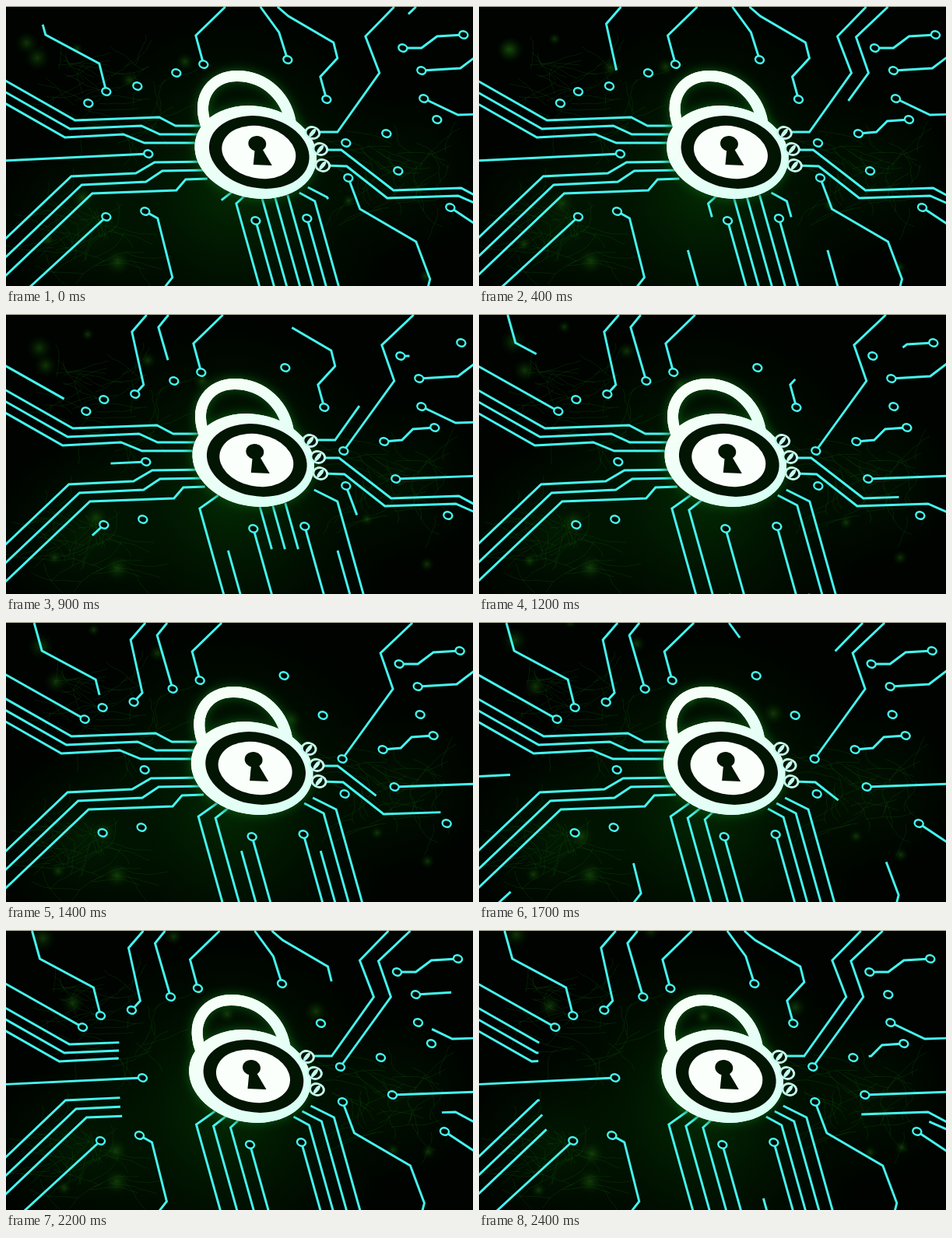
Write an HTML page with a canvas that moves like this. It is 600 px wide and 360 px high and loops after 2.5 s.

```html
<!DOCTYPE html>
<html lang="en">
<head>
<meta charset="utf-8">
<title>Circuit lock</title>
<style>
  html, body { margin: 0; width: 100%; height: 100%; overflow: hidden; background: #000; }
  canvas { display: block; }
</style>
</head>
<body>
<canvas id="stage" width="600" height="360"></canvas>
<script>
const ctx = document.getElementById('stage').getContext('2d');
const LOOP = 2500, STEP = 100, TAU = Math.PI * 2;
const SPEED = .34;      // px per ms along every wire
const LEAN = .28;       // sideways run of the wires that rise from the bottom
const DRIFT = 1 / 300;  // px per ms, whole scene to the left
const CYAN = '#45f8f0', DARK = '#021402';
const clamp = (v, lo, hi) => Math.max(lo, Math.min(hi, v));
const wires = [], dots = [];

// A wire is lit, drains along its path from each "off" time and refills after the gap.
// ends: 1 puts a dot on the last point, 2 on the first as well.
function wire(path, offs = [], { ends = 0, gap = 1070 } = {}) {
  const pts = path.trim().split(' ').map(p => p.split(',').map(Number));
  let len = 0;
  pts.reduce((a, b) => (len += Math.hypot(b[0] - a[0], b[1] - a[1]), b));
  if (ends > 0) dots.push(pts[pts.length - 1]);
  if (ends > 1) dots.push(pts[0]);
  const on = [-Infinity, ...offs.map(t => t + gap)], off = [...offs, Infinity];
  wires.push({ shape: new Path2D('M' + pts.join('L')), len, on, off });
}
const lead = (path, ...offs) => wire(path, offs, { ends: 1 });
const link = (path, ...offs) => wire(path, offs, { ends: 2, gap: 390 });
const rise = (x, y, rest = '') => `${x + LEAN * (362 - y)},362 ${x},${y} ${rest}`;

// top
lead('40,0 50,36 119,73 128,109', -70);
lead('-12,58 105,124', -470);
lead('183,0 164,22 179,90 168,102', -935);
lead('211,0 198,16 218,85', -360);
lead('281,0 243,37 253,74');
lead('326,0 350,33 361,68', 560);
lead('348,0 362,12 420,46 425,66 403,90 411,119', 820);
lead('526,0 485,39 501,85 436,175', -1110);
wire('498,0 461,38 479,85 425,161 395,161', [480]);

// right
link('587,36 553,38 533,53 509,53', 690);
link('553,145 525,147 511,161 488,163', -190, 1860);
lead('612,57 583,79 533,82', 2080);
lead('612,138 580,139 536,118', 950);
lead('612,207 503,211', -500);
lead('612,286 570,258', 500);
lead('541,362 544,350 526,302 454,260 439,220', 460);
wire('612,248 584,233 497,236 430,184 405,184', [985]);
wire('612,257 580,243 489,246 437,205 408,204', [1245]);

// bottom
lead(rise(320, 275));
lead(rise(386, 272));
lead('28,362 128,270', 560);
lead('202,362 213,348 194,272 178,263', 460);
for (let i = 0; i < 3; i++) {
  const off = [-820 + 470 * i];
  wire(rise(251 + 22 * i, 249 + 2 * i, `${275 + 16 * i},${232 + 5 * i}`), off);
  wire(rise(428 - 16 * i, 240 + 5 * i, `${398 - 11 * i},${225 + 7 * i}`), off);
  wire(rise(327 + 17 * i, 242), [715], { gap: 1630 + 90 * Math.abs(i - 1) });
}

// left: two bundles of three, each running from the lock to the edge
lead('-6,198 182,189', 480);
for (let i = 0; i < 3; i++) {
  const y = 11 * i, sq = i * i;
  const up = 88 - 6.5 * i, down = 83 + 13.5 * i;
  wire(`258,${153 + y} ${217 - 20 * i},${153 + y} ${196 - 23 * i},${142 + y} ${up},${146 + y} -4,${146 + y - .57 * (up + 4)}`, [1880]);
  wire(`258,${199 + y} ${190 + 10 * sq},${200 + y} ${166 + 13 * sq},${214 + y} ${down},${218 + y} -4,${218 + y + .95 * (down + 4)}`, [1880]);
}

let seed = 11;
const rnd = () => (seed = seed * 16807 % 2147483647) / 2147483647;
const between = (lo, hi) => lo + (hi - lo) * rnd();

// Faint roots spreading from three knots behind the circuit.
const roots = new Path2D();
for (const [kx, ky] of [[130, 120], [95, 290], [510, 215]]) {
  for (let i = 0; i < 45; i++) {
    let x = kx + between(-70, 70), y = ky + between(-45, 45), dir = between(0, TAU);
    roots.moveTo(x, y);
    for (let k = 0; k < 6; k++) {
      dir += between(-.4, .4);
      roots.lineTo(x += 11 * Math.cos(dir), y += 7 * Math.sin(dir));
    }
  }
}

const sparks = Array.from({ length: 12 }, () => ({
  x: between(0, 600), y: between(10, 350), vx: between(0, .045), vy: between(-.05, .025), r: between(7, 18)
}));

function softSpot(x, y, r, color) {
  const g = ctx.createRadialGradient(x, y, 0, x, y, r);
  g.addColorStop(0, color);
  g.addColorStop(1, 'rgba(0,30,0,0)');
  ctx.fillStyle = g;
  ctx.fillRect(x - r, y - r, 2 * r, 2 * r);
}

function oval(x, y, rx, ry, fill, turn = .2) {
  ctx.beginPath();
  ctx.ellipse(x, y, rx, ry, turn, 0, TAU);
  ctx.fillStyle = fill;
  ctx.fill();
}

function drawBackground() {
  softSpot(290, 235, 230, 'rgba(4,62,4,.65)');
  softSpot(100, 280, 120, 'rgba(4,45,4,.5)');
  softSpot(510, 215, 110, 'rgba(4,40,4,.4)');
  ctx.strokeStyle = 'rgba(18,84,14,.3)';
  ctx.lineWidth = 1;
  ctx.stroke(roots);
}

function drawWires(t) {
  ctx.strokeStyle = CYAN;
  ctx.lineWidth = 2.9;
  for (const { shape, len, on, off } of wires) {
    const reach = start => clamp((t - start) * SPEED, 0, len);
    on.forEach((start, i) => {
      const head = reach(start), tail = reach(off[i]);
      if (head <= tail) return;
      ctx.setLineDash([head - tail, 2000]);
      ctx.lineDashOffset = -tail;
      ctx.stroke(shape);
    });
  }
  ctx.setLineDash([]);
  ctx.lineWidth = 2.4;
  for (const [x, y] of dots) {
    oval(x, y, 5.6, 4.6, '#010a02', .3);
    ctx.stroke();
  }
}

const shackle = new Path2D('M256 152C243 113 266 89 296 89C333 89 362 117 366 156');
const keySlot = new Path2D('M319 182L328 182L341 204L317 203Z');

function drawLock() {
  const pale = ctx.createLinearGradient(260, 130, 390, 240);
  pale.addColorStop(0, '#f6fff8');
  pale.addColorStop(1, '#d6fff4');

  // First pass lays the glow, second covers it with clean shapes.
  ctx.strokeStyle = pale;
  ctx.lineWidth = 14;
  ctx.shadowColor = '#0a5a12';
  for (const blur of [14, 0]) {
    ctx.shadowBlur = blur;
    ctx.stroke(shackle);
    oval(320, 187, 79, 59, pale);
  }

  oval(324.5, 187, 65, 46, DARK);
  oval(324, 187, 48, 33.5, '#fbfffb');
  oval(322, 176, 11.5, 10, DARK);
  ctx.fill(keySlot);

  for (const [x, y] of [[393, 162], [403, 183], [406, 204]]) {
    oval(x, y, 10.5, 8.8, '#c4fbee');
    oval(x, y, 7.5, 6, DARK);
    oval(x, y, 6.5, 2.6, '#c4fbee', -.9);
  }
}

function draw(t) {
  ctx.fillStyle = '#000300';
  ctx.fillRect(0, 0, 600, 360);
  ctx.save();
  ctx.translate(.8 - t * DRIFT, 1);
  drawBackground();
  for (const s of sparks) softSpot(s.x + s.vx * t, s.y + s.vy * t, s.r, 'rgba(30,95,14,.55)');
  drawWires(t);
  drawLock();
  ctx.restore();
  ctx.fillStyle = '#c8c8b4';
  ctx.fillRect(0, 0, 600, 1);
}

const begin = performance.now();
function tick() {
  const t = (performance.now() - begin) % LOOP;
  draw(Math.floor(t / STEP) * STEP);
  requestAnimationFrame(tick);
}
tick();
</script>
</body>
</html>
```
